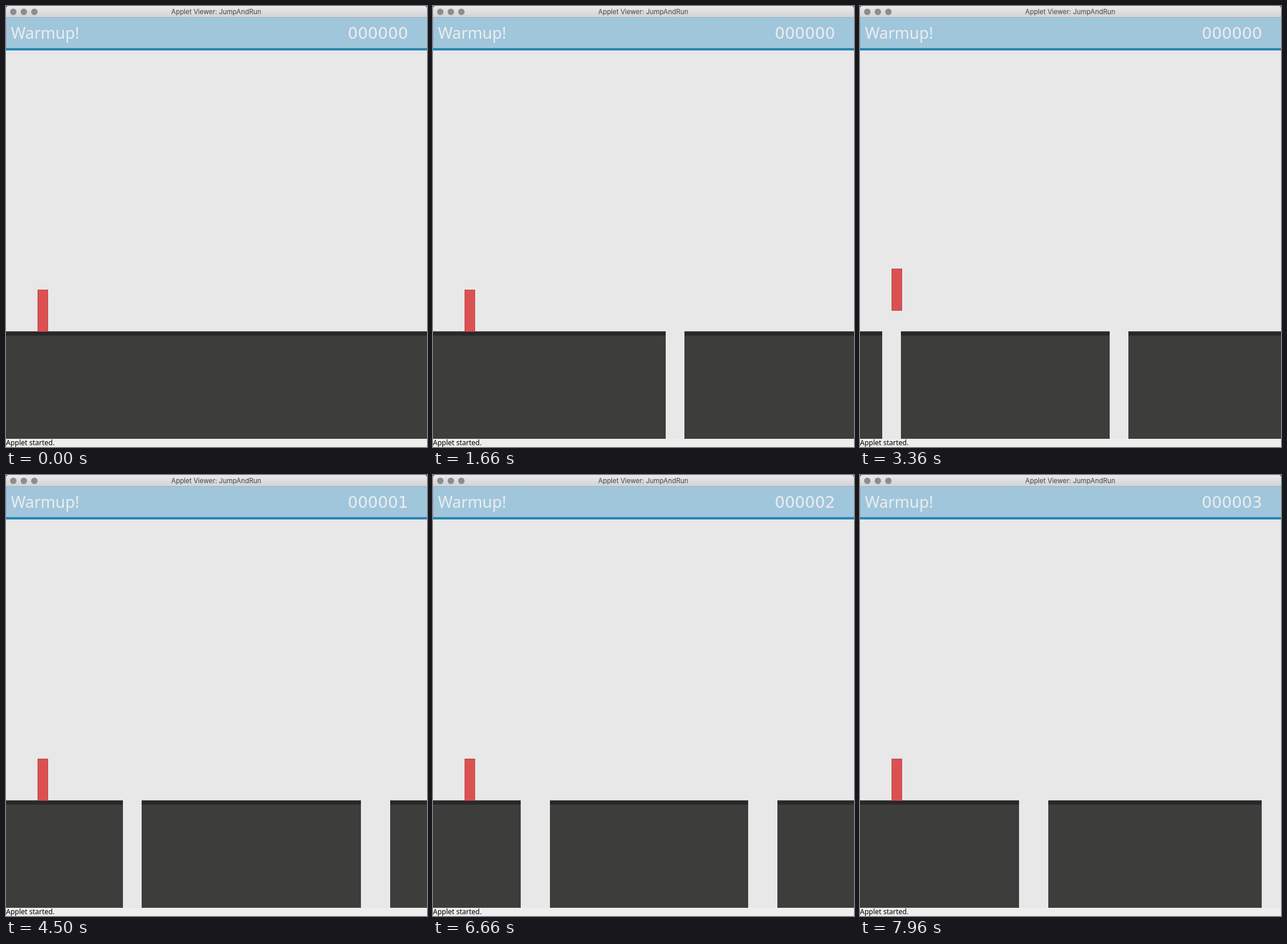
Animation of 720x754 px, one loop 8 s. Source, as an HTML page:

```html
<!DOCTYPE html>
<html lang="en">
<head>
<meta charset="utf-8">
<title>Jump and run</title>
<style>
  html, body { margin: 0; width: 100%; height: 100%; overflow: hidden; background: #e7e8e7; }
  svg { display: block; width: 720px; height: 754px; }
  .title { font: 11.4px Inter, sans-serif; fill: #444; }
  .label { font: 27px "Noto Sans", sans-serif; fill: #ededed; }
  .score { font: 27px "DejaVu Sans", sans-serif; fill: #ededed; }
  .status { font: 12px "Noto Sans", sans-serif; fill: #000; }
</style>
</head>
<body>
<svg viewBox="0 0 720 754">
  <defs>
    <linearGradient id="bar" x2="0" y2="1">
      <stop stop-color="#eaeaea"/>
      <stop offset="1" stop-color="#d2d2d2"/>
    </linearGradient>
  </defs>
  <rect width="720" height="754" fill="#e7e8e7"/>

  <rect width="720" height="10" fill="#2b2b2b"/>
  <path d="M0 20V4a4 4 0 0 1 4-4H716a4 4 0 0 1 4 4V20Z" fill="url(#bar)"/>
  <g fill="#8d8d8d">
    <circle cx="12.5" cy="10" r="5.5"/>
    <circle cx="30.5" cy="10" r="5.5"/>
    <circle cx="48.5" cy="10" r="5.5"/>
  </g>
  <text class="title" x="359.5" y="14" text-anchor="middle">Applet Viewer: JumpAndRun</text>

  <rect y="20" width="720" height="53" fill="#a0c6dc"/>
  <path d="M0 19.5H720M.5 20V73" stroke="#98b4c4"/>
  <rect y="72" width="720" height="4" fill="#2a84b6"/>
  <text class="label" x="8.5" y="56">Warmup!</text>
  <text class="score" id="score" x="584.5" y="56">000000</text>

  <rect y="556.5" width="720" height="183.5" fill="#3d3d3b"/>
  <rect y="556.5" width="720" height="7" fill="#282828"/>
  <g id="gaps" fill="#e7e8e7"></g>
  <rect id="player" x="54.5" y="485.5" width="17" height="71" fill="#dd5051" stroke="#b94546"/>

  <rect y="740" width="720" height="14" fill="#eeeeec"/>
  <text class="status" x="0" y="751">Applet started.</text>
</svg>
<script>
const LOOP = 8000;
const JUMP_STEP = 18, JUMP_PEAK = 5;
const jumpTicks = [93, 151, 210];

// [time in ms, left edge of the first gap]
const track = [
  [100, 720], [930, 548.5], [1660, 398], [1760, 377], [2600, 203], [3360, 38],
  [3430, 24], [4260, -139], [4500, -189], [5700, -434], [6660, -646],
  [6760, -667], [7960, -913]
];

// offset from the first gap, width
const gaps = [[0, 32], [389, 32], [796, 50], [1185, 50], [1600, 50]].map(([offset, width]) => {
  const el = document.createElementNS("http://www.w3.org/2000/svg", "rect");
  el.setAttribute("y", 556);
  el.setAttribute("height", 184);
  el.setAttribute("width", width);
  document.getElementById("gaps").append(el);
  return { offset, width, el };
});
const player = document.getElementById("player");
const score = document.getElementById("score");

function scrollAt(time) {
  if (time <= track[0][0]) return track[0][1];
  const i = track.findIndex(([t]) => t >= time);
  if (i < 0) return track[track.length - 1][1];
  const [t0, x0] = track[i - 1], [t1, x1] = track[i];
  return x0 + (x1 - x0) * (time - t0) / (t1 - t0);
}

function jumpHeight(tick) {
  return Math.max(0, ...jumpTicks.map(start =>
    JUMP_STEP * (JUMP_PEAK - Math.abs(tick - start - JUMP_PEAK))));
}

function draw(time) {
  // 30 ticks per second, with tick starts rounded down to 10 ms
  const tick = Math.floor((Math.floor(time / 10) * 10 + 7) * 0.03);
  const scroll = scrollAt(Math.floor(tick * 10 / 3) * 10);
  let passed = 0;
  for (const { offset, width, el } of gaps) {
    const left = Math.round(scroll + offset);
    el.setAttribute("x", left);
    if (left + width < 0) passed++;
  }
  player.setAttribute("y", 485.5 - jumpHeight(tick));
  score.textContent = String(passed).padStart(6, "0");
}

const begin = performance.now();
function loop() {
  draw((performance.now() - begin) % LOOP);
  requestAnimationFrame(loop);
}
loop();
</script>
</body>
</html>
```
